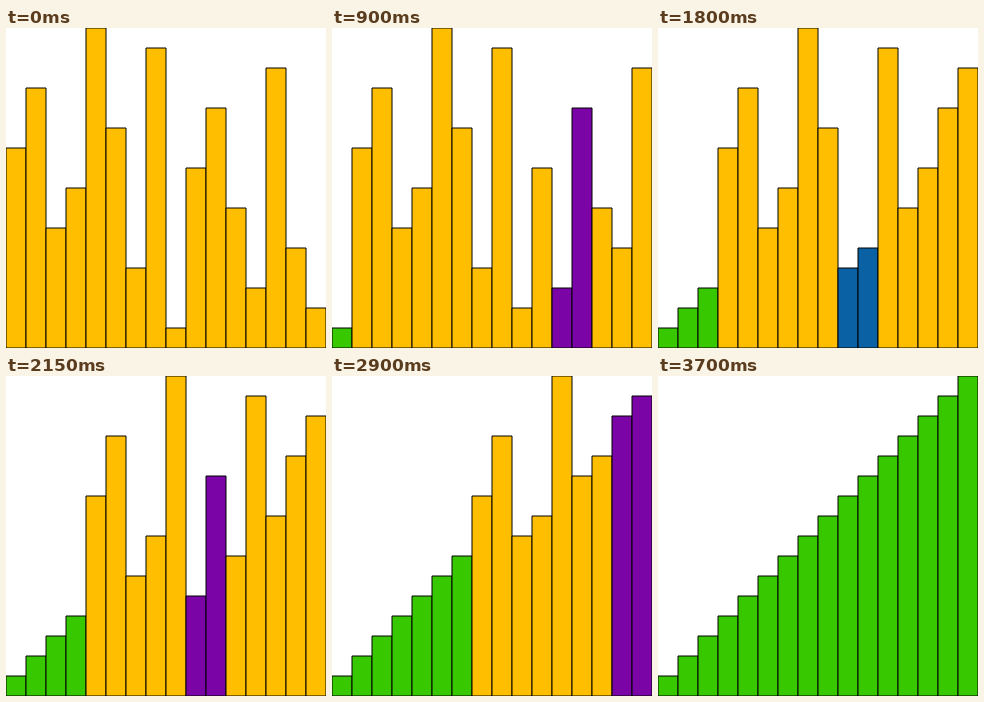
Write an HTML page with a canvas that moves like this. It is 320 by 320 pixels and loops after 4050 ms.

```html
<!DOCTYPE html>
<html lang="en">
<head>
<meta charset="utf-8">
<title>Bubble sort</title>
<style>
  html, body { margin: 0; width: 100%; height: 100%; overflow: hidden; background: #fff; }
  canvas { display: block; }
</style>
</head>
<body>
<canvas id="stage" width="320" height="320"></canvas>
<script>
const SIZE = 320, UNIT = 20;
const LOOP = 4050, START = 300, TICK = 50, STEPS_PER_TICK = 3;
const IDLE = '#ffbf00', COMPARE = '#0a61a4', SWAP = '#7a04a6', DONE = '#38c800';
const START_ORDER = [10, 13, 6, 8, 16, 11, 4, 15, 1, 9, 12, 7, 3, 14, 5, 2];

const ctx = document.getElementById('stage').getContext('2d');

// Records every comparison, swap and finished bar of the sort.
function recordSort(order) {
  const bars = order.slice(), states = [];
  let done = 0;
  const save = (pair = -1, color = IDLE) =>
    states.push({ bars: bars.slice(), done, pair, color });

  save();
  let swapped = true;
  while (swapped) {
    swapped = false;
    for (let i = bars.length - 2; i >= done; i--) {
      save(i, COMPARE);
      if (bars[i] > bars[i + 1]) {
        [bars[i], bars[i + 1]] = [bars[i + 1], bars[i]];
        swapped = true;
        save(i, SWAP);
      }
    }
    done++;
    save();
  }
  while (done < bars.length) {
    done++;
    save();
  }
  return states;
}

const states = recordSort(START_ORDER);

function stateAt(ms) {
  if (ms < START) return states[0];
  const step = Math.floor((ms - START) / TICK) * STEPS_PER_TICK + 1;
  return states[Math.min(step, states.length - 1)];
}

function draw({ bars, done, pair, color }) {
  ctx.fillStyle = '#fff';
  ctx.fillRect(0, 0, SIZE, SIZE);
  ctx.strokeStyle = '#000';
  ctx.lineWidth = 1;
  bars.forEach((value, i) => {
    const h = value * UNIT;
    const active = pair >= 0 && (i === pair || i === pair + 1);
    ctx.fillStyle = active ? color : i < done ? DONE : IDLE;
    ctx.beginPath();
    ctx.rect(i * UNIT, SIZE - h, UNIT, h);
    ctx.fill();
    ctx.stroke();
  });
}

const begin = performance.now();
function tick() {
  draw(stateAt((performance.now() - begin) % LOOP));
  requestAnimationFrame(tick);
}
tick();
</script>
</body>
</html>
```
